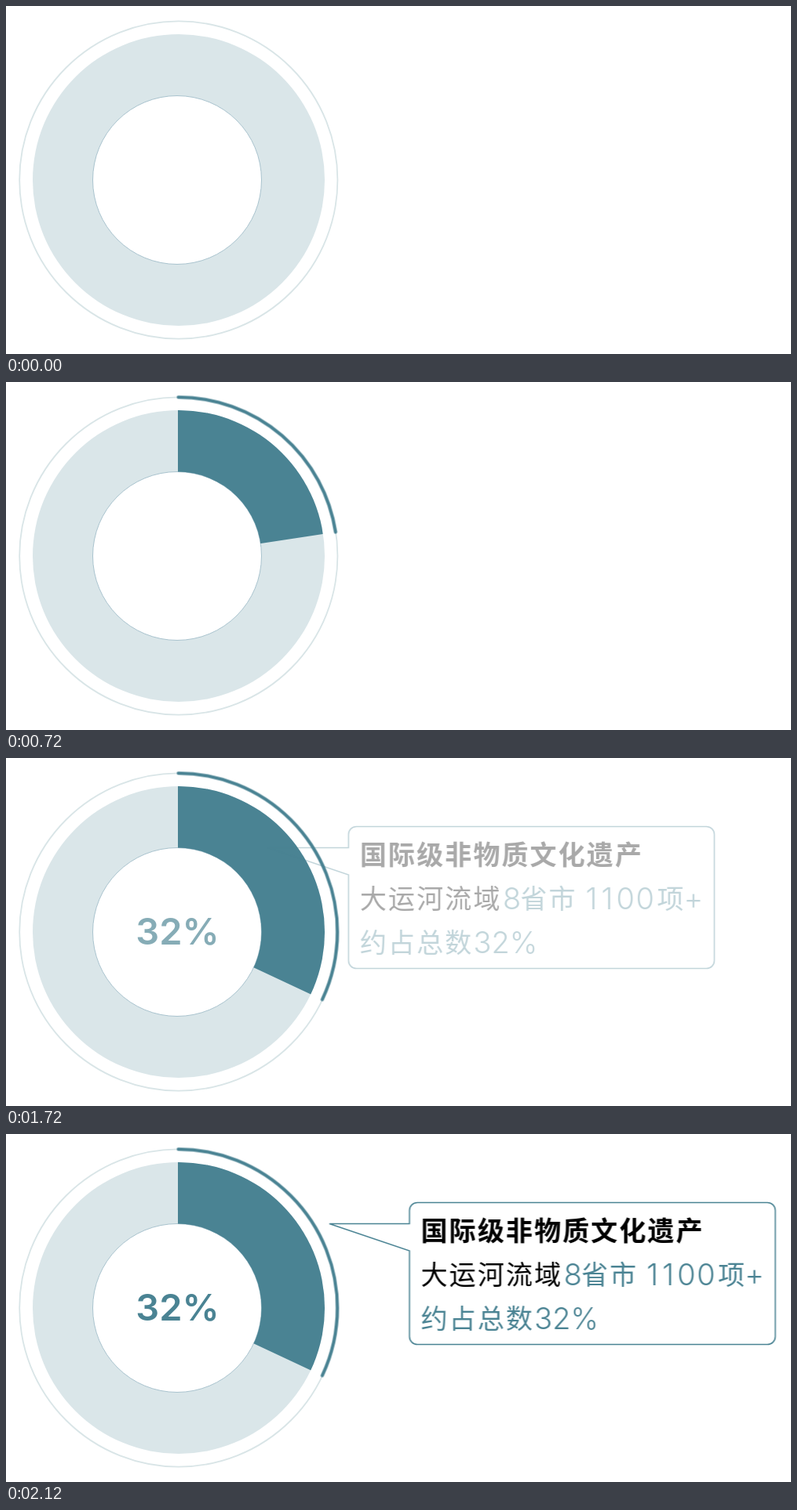
Animation, 1000 px wide and 444 px high, one loop 8000 ms. Source, as an HTML page without scripts:

```html
<!DOCTYPE html>
<html lang="zh-CN">
<head>
<meta charset="utf-8">
<title>32%</title>
<style>
  html, body { margin: 0; width: 100%; height: 100%; overflow: hidden; background: #fff; }
  svg { display: block; width: 100%; height: 100%; }

  .sweep {
    fill: none;
    stroke-dasharray: 32 200;
    animation: sweep 8s linear infinite;
  }
  .arc { animation: show 8s step-end infinite; }
  .share { animation: fade 8s linear infinite; }
  .callout { animation: slide 8s linear infinite, appear 8s linear infinite; }

  @keyframes sweep {
    0% { stroke-dashoffset: 32; }
    1% { stroke-dashoffset: 32; animation-timing-function: cubic-bezier(.264, 0, .55, 1); }
    15%, 100% { stroke-dashoffset: 0; }
  }
  @keyframes show {
    0% { opacity: 0; }
    1.25%, 100% { opacity: 1; }
  }
  @keyframes fade {
    0%, 17.5% { opacity: 0; }
    23.5%, 100% { opacity: 1; }
  }
  @keyframes slide {
    0%, 20.5% { transform: translateX(-93.5px); }
    26.5%, 100% { transform: none; }
  }
  @keyframes appear {
    0%, 20.5% { opacity: 0; }
    23.5%, 100% { opacity: 1; }
  }

  .teal { fill: #4a8393; }
  .num { font-family: Inter, Roboto, sans-serif; font-size: 38px; font-weight: 300; }
  .han {
    font-family: "Noto Sans CJK SC", "Noto Sans CJK", "Noto Sans CJK JP", sans-serif;
    font-size: 34px; font-weight: 350; letter-spacing: 2.1px;
  }
  .title { font-weight: 700; }
  .share { font: 600 47px Inter, Roboto, sans-serif; text-anchor: middle; }
</style>
</head>
<body>
<svg viewBox="0 0 1000 444">
  <defs>
    <mask id="sector" maskUnits="userSpaceOnUse" x="0" y="0" width="444" height="444">
      <circle class="sweep" cx="219" cy="222" r="100" pathLength="100"
              stroke="#fff" stroke-width="200" transform="rotate(-90 219 222)"/>
      <circle cx="218" cy="222" r="107.5" fill="#000"/>
    </mask>
  </defs>

  <circle cx="219.8" cy="222" r="202.6" fill="none" stroke="#d9e5e7" stroke-width="1.8"/>
  <circle cx="220" cy="222" r="186" fill="#dae6e9"/>
  <circle cx="218" cy="222" r="107.5" fill="#fff" stroke="#a9c3ce"/>
  <circle class="teal" cx="220" cy="222" r="186" mask="url(#sector)"/>
  <g class="arc">
    <circle class="sweep" cx="219.5" cy="222" r="202.6" pathLength="100" stroke="#4a8393"
            stroke-width="4.2" stroke-linecap="round" transform="rotate(-90 219.5 222)"/>
  </g>

  <text class="share teal" x="218.5" y="238">32%</text>

  <g class="callout">
    <path d="M412 114.5H514V97.5a10 10 0 0 1 10-10H970a10 10 0 0 1 10 10V258.5a10 10 0 0 1-10 10H524a10 10 0 0 1-10-10V149Z"
          fill="none" stroke="#4a8393" stroke-width="1.6"/>
    <text class="han title" x="528.5" y="135.5">国际级非物质文化遗产</text>
    <text class="han" x="528.5" y="192">大运河流域</text>
    <g class="teal">
      <text class="num" x="710.5" y="193">8</text>
      <text class="han" x="733" y="192">省市</text>
      <text class="num" x="816 836 855 880" y="193">1100</text>
      <text class="han" x="907" y="192">项</text>
      <text class="num" x="941" y="193">+</text>
      <text class="han" x="528.5" y="248">约占总数</text>
      <text class="num" x="673" y="249">32%</text>
    </g>
  </g>
</svg>
</body>
</html>
```
